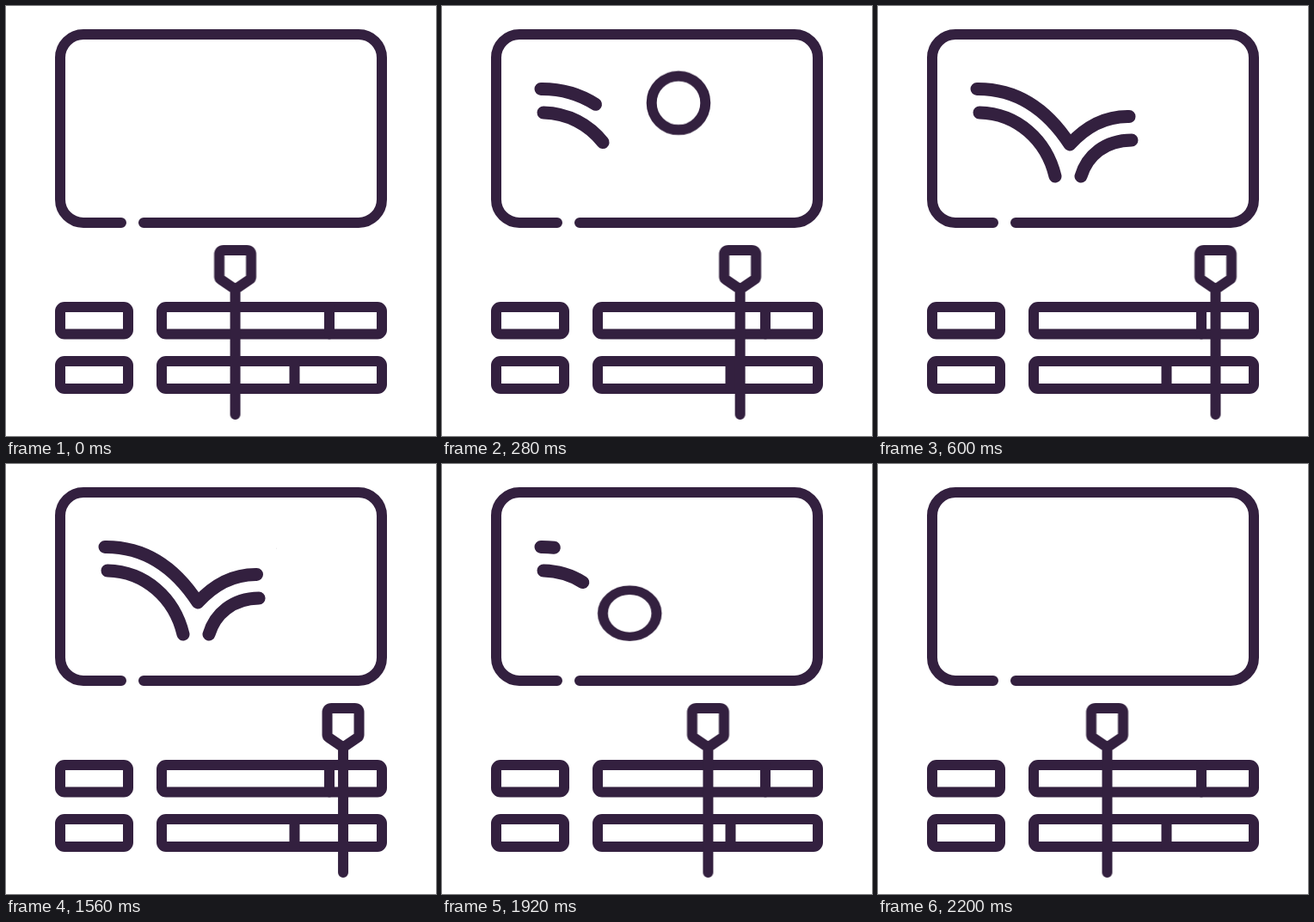
Write an HTML page that moves like this. It is 500x500 px and loops after 3 s.

```html
<!DOCTYPE html>
<html lang="en">
<head>
<meta charset="utf-8">
<title>Motion editor icon</title>
<style>
  html, body { margin: 0; width: 100%; height: 100%; overflow: hidden; background: #fff; }
  svg { display: block; width: 100%; height: 100%; }
  svg * { fill: none; stroke: #33203f; stroke-width: 12; stroke-linecap: round; stroke-linejoin: round; }

  .playhead, .ball, .ball circle, .trail { animation: 3s linear infinite; }

  .playhead { animation-name: scrub; }
  @keyframes scrub {
    0% { transform: translateX(266.5px); animation-timing-function: cubic-bezier(.59, 0, .28, 1); }
    18.667%, 50.667% { transform: translateX(392.5px); animation-timing-function: cubic-bezier(.72, 0, .666, 1); }
    69.333%, 100% { transform: translateX(266.5px); }
  }

  .ball {
    offset-path: path("M114 108Q198 107 220 179Q250 110 315 98");
    offset-rotate: 0deg;
    animation-name: bounce;
  }
  @keyframes bounce {
    0% { offset-distance: 0%; animation-timing-function: cubic-bezier(.745, 0, .145, 1); }
    16%, 50.667% { offset-distance: 100%; animation-timing-function: cubic-bezier(.85, 0, .72, 1); }
    69.333%, 100% { offset-distance: 0%; }
  }

  /* Grow in, squash on the ground, shrink away; then the same on the way back. */
  .ball circle { animation-name: squash; }
  @keyframes squash {
    0%, 1% { transform: scale(0); }
    5.333%, 6.667% { transform: scale(1); }
    7.4% { transform: scale(1, .86); }
    8.4%, 13.333% { transform: scale(1); }
    17.333%, 52% { transform: scale(0); }
    56%, 62.8% { transform: scale(1); }
    64% { transform: scale(1, .86); }
    65.333% { transform: scale(1); }
    69.333%, 100% { transform: scale(0); }
  }

  /* Offset 1 is an empty line; 1.5 also keeps its round cap hidden. */
  .trail { stroke-width: 15; stroke-dasharray: 1 2; stroke-dashoffset: 1.5; }
  .upper { animation-name: upper; }
  .lower { animation-name: lower; }
  .rebound { animation-name: rebound; }
  @keyframes upper {
    0%, 6.8% { stroke-dashoffset: 1.5; }
    6.81% { stroke-dashoffset: 1; animation-timing-function: cubic-bezier(.2, 0, .2, 1); }
    20%, 51.5% { stroke-dashoffset: 0; animation-timing-function: cubic-bezier(.5, 0, .6, 1); }
    64% { stroke-dashoffset: .927; }
    73.2% { stroke-dashoffset: 1; }
    73.21%, 100% { stroke-dashoffset: 1.5; }
  }
  @keyframes lower {
    0%, 6.8% { stroke-dashoffset: 1.5; }
    6.81% { stroke-dashoffset: 1; animation-timing-function: cubic-bezier(.2, 0, .28, 1); }
    13.333%, 57.333% { stroke-dashoffset: 0; animation-timing-function: ease-in-out; }
    69.2% { stroke-dashoffset: 1; }
    69.21%, 100% { stroke-dashoffset: 1.5; }
  }
  @keyframes rebound {
    0%, 12.5% { stroke-dashoffset: 1.5; }
    12.51% { stroke-dashoffset: 1; animation-timing-function: cubic-bezier(.2, 0, .4, 1); }
    20%, 51.5% { stroke-dashoffset: 0; animation-timing-function: ease-in-out; }
    58.5% { stroke-dashoffset: 1; }
    58.51%, 100% { stroke-dashoffset: 1.5; }
  }
</style>
</head>
<body>
<svg viewBox="0 0 500 500">
  <path d="M134 252H90a27 27 0 0 1-27-27V60a27 27 0 0 1 27-27H410a27 27 0 0 1 27 27V225a27 27 0 0 1-27 27H160"/>

  <rect x="63" y="350" width="79" height="31.5" rx="5"/>
  <rect x="63" y="413" width="79" height="32" rx="5"/>
  <rect x="181" y="350" width="256" height="31.5" rx="5"/>
  <rect x="181" y="413" width="256" height="32" rx="5"/>
  <path d="M376 350V381.5M335.5 413V445"/>

  <path class="trail upper" pathLength="1" d="M115 96.5C163 96 197 121 223 161C243 139 267 128 292 128.5"/>
  <path class="trail lower" pathLength="1" d="M118 124C162 125 196 156 206 198"/>
  <path class="trail rebound" pathLength="1" d="M236 198C243 174 264 156 295 156"/>

  <g class="ball"><circle r="31.3"/></g>

  <path class="playhead" d="M-13.5 284H13.5q5 0 5 5V315q0 2-2 3.3L0 329.5L-16.5 318.3q-2-1.3-2-3.3V289q0-5 5-5zM0 330V475"/>
</svg>
</body>
</html>
```
